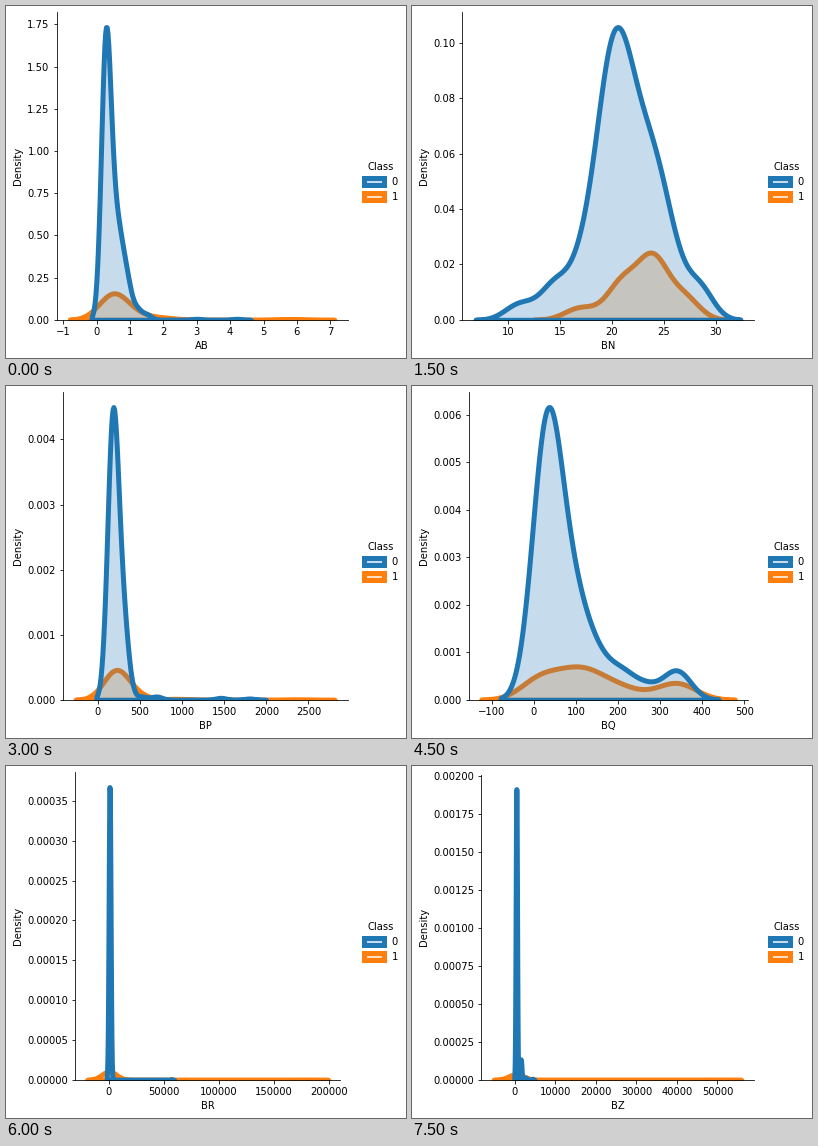
Recreate the animation shown at these times as a matplotlib script. Size 400 px wide and 352 px high, loop 8 s.

```python
import numpy as np
import matplotlib.pyplot as plt
from matplotlib.animation import FuncAnimation
from matplotlib.patches import Patch

W, H, DPI = 400, 352, 72
PAD = 7.2
BLUE, ORANGE = "#1f77b4", "#ff7f0e"
STEP_MS, STEPS, HOLD = 500, 16, 3

plt.rcParams.update({"font.family": "DejaVu Sans", "font.size": 10})

# name, height unit, then (bandwidth, {kernel centre: height}) for class 0 and class 1
PLOTS = [
    ("AB", 1,
     (.14, {.27: 1.58, .48: .42, .68: .34, .9: .2, 1.2: .06, 1.5: .03, 3: .006, 4.2: .006}),
     (.437, {.51: .152, 1.25: .02, 2: .01, 5.81: .004})),
    ("BN", 1e-3,
     (1.35, {10.95: 5, 12.7: 2, 14.6: 12, 17.3: 19, 19.4: 51, 20.7: 46,
             22: 38, 23.8: 38, 25.5: 21, 28.3: 12}),
     (1.45, {16.8: 4, 18.8: 1, 21: 13, 23.9: 21.5, 26.9: 8})),
    ("BP", 1e-3,
     (65, {180: 4.28, 300: 1.1, 520: .05, 700: .05, 1460: .03, 1800: .02}),
     (145, {173: .21, 260: .26, 480: .05, 950: .015, 2375: .005})),
    ("BQ", 1e-3,
     (33, {20: 3.15, 45: 3.15, 95: 1.6, 145: .75, 205: .52, 265: .26, 340: .6}),
     (46, {13: .41, 80: .32, 130: .4, 200: .22, 265: .05, 340: .34})),
    ("BR", 1e-5,
     (860, {900: 37.1, 56900: .06}),
     (6600, {400: 1.05, 179600: .01})),
    ("BZ", 1e-5,
     (170, {350: 192, 1450: 13.5, 2700: 1.5, 4300: .7}),
     (1850, {310: 3.7, 50320: .05})),
]

fig, ax = plt.subplots(figsize=(W / DPI, H / DPI), dpi=DPI, facecolor="white")


def style(color):
    return dict(facecolor=(color, 0.25), edgecolor=color, linewidth=5)


def density(bandwidth, kernels):
    """Sum of equal-width Gaussians, cut three bandwidths past the outer ones."""
    x = np.linspace(min(kernels) - 3 * bandwidth, max(kernels) + 3 * bandwidth, 200)
    y = sum(h * np.exp(-0.5 * ((x - c) / bandwidth) ** 2) for c, h in kernels.items())
    return x, y


def fit_layout():
    """Place the axes so that they and their labels fill the area left of the legend."""
    fig.subplots_adjust(left=0.18, right=0.84, bottom=0.11, top=0.97)
    area = (PAD / W, PAD / H, 341.6 / W, 1 - 6.4 / H)
    for _ in range(2):
        fig.tight_layout(pad=0, rect=area)


def draw(step):
    name, unit, blue, orange = PLOTS[step // HOLD]
    ax.clear()
    for color, kde in ((ORANGE, orange), (BLUE, blue)):
        x, y = density(*kde)
        fill = ax.fill_between(x, 0, y * unit, **style(color))
        fill.sticky_edges.y[:] = (0, np.inf)
    ax.autoscale_view()
    ax.spines[["top", "right"]].set_visible(False)
    ax.set_xlabel(name)
    ax.set_ylabel("Density")
    fit_layout()
    return []


handles = [Patch(label=str(i), **style(c)) for i, c in enumerate((BLUE, ORANGE))]
fig.legend(handles=handles, title="Class", frameon=False, loc="center left",
           borderaxespad=0, bbox_to_anchor=(353.6 / W, 176.4 / H))

anim = FuncAnimation(fig, draw, frames=STEPS, init_func=lambda: draw(0),
                     interval=STEP_MS, repeat=True, repeat_delay=0)
plt.show()
```
